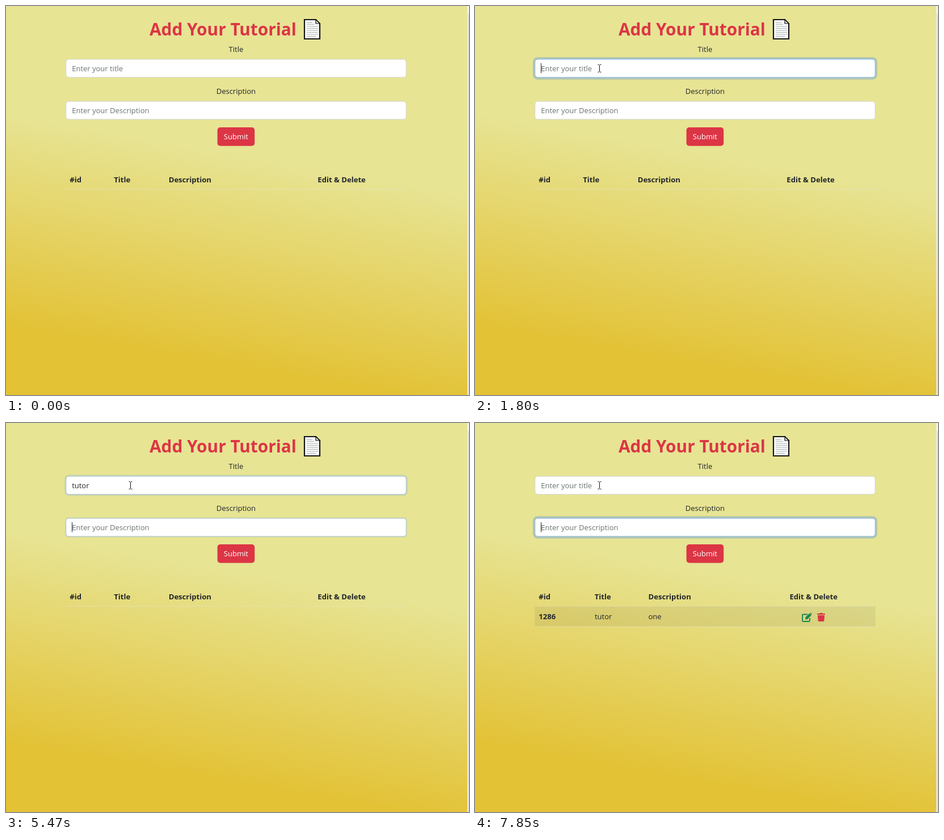
Recreate the animation shown at these times as an HTML page. Size 816 px wide and 686 px high, loop 8 s.

```html
<!DOCTYPE html>
<html lang="en">
<head>
<meta charset="utf-8">
<title>Add Your Tutorial</title>
<style>
  html, body { margin: 0; width: 100%; height: 100%; overflow: hidden; }
  body { background: linear-gradient(10deg, #e3c236 15%, #e7e494 60%); }
  svg { display: block; width: 816px; height: 686px; }
  text { font: 13px "Open Sans", "Noto Sans", sans-serif; fill: #212529; white-space: pre; }
  .bold { font-size: 13.1px; font-weight: 700; }
  .mid { text-anchor: middle; }
  .heading { font-size: 29.8px; font-weight: 700; fill: #dc3545; }
  .hint { fill: #6a746e; }
  .rule { fill: #dee2e6; opacity: .48; }
</style>
</head>
<body>
<svg viewBox="0 0 816 686">
  <rect x="813" width="3" height="686" fill="#f3f3ee"/>
  <rect x="814.5" y="14" width="1" height="672" fill="#c9c9c4"/>

  <text class="heading" x="253" y="51.5">Add Your Tutorial</text>
  <g id="page">
    <path d="M526 24H546L553 31V58H526Z" fill="#fafafa" stroke="#151515" stroke-width="2.2"/>
    <path d="M546 24V31H553Z" fill="#d5d5d5" stroke="#151515" stroke-width="1.2"/>
    <path d="M530 29.5H540M530 32.5H543M530 36H550M530 39.5H550M530 43H550M530 46.5H550M530 50H550M530 53.5H546" stroke="#a9b0b0"/>
  </g>

  <text class="mid" x="405.4" y="81">Title</text>
  <text class="mid" x="405.4" y="155.3">Description</text>
  <g id="fields"></g>

  <rect x="372.6" y="214" width="65.6" height="32.7" rx="5" fill="#dc3545"/>
  <text class="mid" x="405.4" y="235.4" style="fill:#fff">Submit</text>

  <g id="heads">
    <text class="bold" y="311">#id</text>
    <text class="bold" y="311">Title</text>
    <text class="bold" y="311">Description</text>
    <text class="bold" y="311">Edit &amp; Delete</text>
  </g>
  <g id="row">
    <rect x="105.4" y="323" width="600.4" height="36" fill="#000" opacity=".06"/>
    <rect class="rule" x="105.4" y="358.5" width="600.4" height="1"/>
    <text class="bold" x="112.3" y="346">1286</text>
    <text x="211" y="346">tutor</text>
    <text x="305.5" y="346">one</text>
    <g fill="none" stroke="#198754" stroke-width="1.9">
      <path d="M586 337.5H578.5Q577 337.5 577 339V348.5Q577 350 578.5 350H588.5Q590 350 590 348.5V344"/>
      <path d="M582 346.2L582.5 342.6L589.6 335.5L593 338.9L585.8 346Z" fill="#198754" stroke="none"/>
      <path d="M590.4 334.9L591.4 334.2L594 336.8L593.4 337.9Z" fill="#198754" stroke="none"/>
    </g>
    <path d="M603 336H607L608 335H612L613 336H617V338H603ZM604 339H616L615.4 348.6Q615.2 350 613.8 350H606.2Q604.8 350 604.6 348.6Z" fill="#dc3545"/>
  </g>
  <rect class="rule" x="105.4" y="322.6" width="600.4" height="1"/>

  <path id="arrow" d="M.5.5V14.5L3.8 11.4L6 16.4L8.2 15.5L6 10.7H10.5Z" fill="#fff" stroke="#000" stroke-width=".9"/>
  <path id="beam" d="M-3 -6.5H-1L0 -5.5L1 -6.5H3M0 -5.5V5.5M-3 6.5H-1L0 5.5L1 6.5H3" fill="none" stroke="#111"/>
</svg>
<script>
const LOOP = 8000, TICK = 1000 / 15, FADE = 150;
const SENT = 7190, LISTED = 7650, TAB = 5400;
const INPUT = { x: 105.4, w: 600.2, h: 32.6 };
const $ = id => document.getElementById(id);

const clamp = v => Math.min(1, Math.max(0, v));
const smooth = v => (v = clamp(v), v * v * (3 - 2 * v));
const mix = (a, b, p) => a + (b - a) * p;
const mixRgb = (a, b, p) => `rgb(${a.map((v, i) => Math.round(mix(v, b[i], p)))})`;

function make(tag, attrs, parent) {
  const el = document.createElementNS("http://www.w3.org/2000/svg", tag);
  set(el, attrs);
  return parent.appendChild(el);
}
function set(el, attrs) {
  for (const key in attrs) el.setAttribute(key, attrs[key]);
}
const show = (el, on) => el.style.display = on ? "" : "none";

// keys: when each letter lands; blinks: when the caret toggles, starting with on
function makeField(spec) {
  const g = $("fields");
  const ring = make("rect", { fill: "#0d6efd" }, g);
  const box = make("rect", { x: INPUT.x + .45, y: spec.y + .45, width: INPUT.w - .9, height: INPUT.h - .9, rx: 4.8, fill: "#fff", "stroke-width": .9 }, g);
  const text = make("text", { x: 116.2, y: spec.y + 21.5 }, g);
  const caret = make("rect", { y: spec.y + 7.2, width: 1, height: 17.5, fill: "#222" }, g);
  return { ...spec, ring, box, text, caret };
}
const fields = [
  makeField({ y: 93.6, hint: "Enter your title", word: "tutor", keys: [3540, 3810, 4150, 4670, 4940],
    focus: 1590, blur: TAB, blinks: [1600, 2200, 2740, 3280, 3540, 5410] }),
  makeField({ y: 167.7, hint: "Enter your Description", word: "one", keys: [6280, 6530, 6860],
    focus: TAB, blur: Infinity, blinks: [5410, 5940, 6280, 7330, 7850] })
];

function drawField(f, t, tick) {
  const p = smooth((tick - f.focus) / FADE) - smooth((tick - f.blur) / FADE);
  const s = 3.45 * p;
  set(f.ring, { x: INPUT.x - s, y: f.y - s, width: INPUT.w + 2 * s, height: INPUT.h + 2 * s, rx: 5 + s, opacity: .25 * p });
  f.box.setAttribute("stroke", mixRgb([206, 212, 218], [134, 183, 254], p));

  const typed = t < SENT ? f.word.slice(0, f.keys.filter(k => t >= k).length) : "";
  f.text.textContent = typed || f.hint;
  f.text.setAttribute("class", typed ? "" : "hint");
  const end = typed ? f.text.getComputedTextLength() : 0;
  f.caret.setAttribute("x", Math.round(116.2 + end));
  show(f.caret, f.blinks.filter(b => t >= b).length % 2);
}

function drawPointer(t, tick) {
  const a = smooth((tick - 66) / 800), b = smooth((tick - 866) / 400);
  const x = mix(mix(730, 223, a), 219.5, b);
  const y = mix(mix(661, 139, a), 110, b);
  const inField = y < 126;
  show($("arrow"), t >= 70 && !inField);
  show($("beam"), inField);
  for (const id of ["arrow", "beam"]) $(id).setAttribute("transform", `translate(${x} ${y})`);
}

function draw(t) {
  const tick = Math.floor((t + .5) / TICK) * TICK;
  fields.forEach(f => drawField(f, t, tick));
  drawPointer(t, tick);
  const listed = t >= LISTED;
  show($("row"), listed);
  const cols = listed ? [112.3, 210.7, 305.5, 554.5] : [112.3, 190.2, 286.7, 549.3];
  [...$("heads").children].forEach((el, i) => el.setAttribute("x", cols[i]));
}

const start = performance.now();
function loop() {
  draw((performance.now() - start) % LOOP);
  requestAnimationFrame(loop);
}
loop();
</script>
</body>
</html>
```
